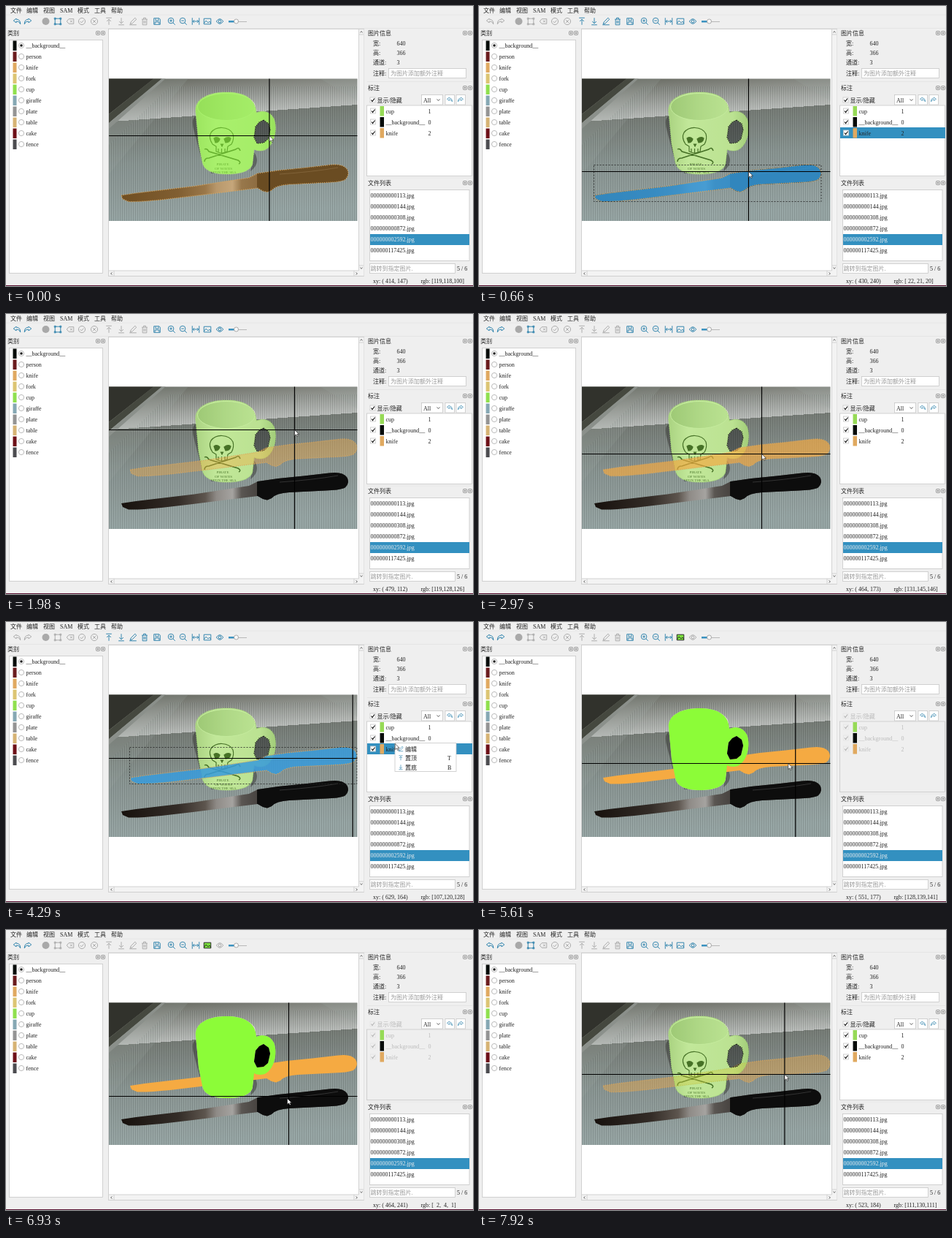
These frames come from a looping animation (640x383 px, 8000 ms). An HTML page:

```html
<!DOCTYPE html>
<html lang="zh">
<head>
<meta charset="utf-8">
<style>
html, body { margin: 0; width: 100%; height: 100%; overflow: hidden; background: #efefef }
svg { display: block; width: 100vw; height: 100vh }
text { font: 8px "Liberation Serif", "Noto Sans CJK SC", "Noto Sans CJK", serif; fill: #222; white-space: pre }
.icon { fill: none; stroke: #2c81ab; stroke-linejoin: round }
.off { stroke: #a9a9a9 }
.box { fill: #fff; stroke: #c8c8c8; stroke-width: .8 }
.hint { fill: #999 }
.dim text, .dim .check { opacity: .25 }
.dim .box { fill: #efefef }
.light { fill: #eee }
.print { fill: none; stroke: #1c1c1c; stroke-width: 1.2 }
.print text { font-size: 5px; text-anchor: middle; fill: #2a2a2a; stroke: none }
.mask { stroke-width: 1.2; stroke-dasharray: 1.2 1.6; fill-rule: evenodd }
</style>
</head>
<body>
<svg viewBox="0 0 640 383">
  <defs>
    <linearGradient id="table" x2=".12" y2="1">
      <stop stop-color="#5f6158"/><stop offset=".3" stop-color="#74797380"/>
      <stop offset=".3" stop-color="#737872"/>
      <stop offset=".6" stop-color="#87928f"/><stop offset="1" stop-color="#95a3a2"/>
    </linearGradient>
    <linearGradient id="blade">
      <stop stop-color="#17110d"/><stop offset=".25" stop-color="#332c27"/>
      <stop offset=".37" stop-color="#5d554e"/><stop offset=".42" stop-color="#8f8b87"/>
      <stop offset=".49" stop-color="#a5a3a0"/><stop offset=".53" stop-color="#5a5652"/>
      <stop offset=".59" stop-color="#4a4643"/>
    </linearGradient>
    <linearGradient id="mugSide">
      <stop stop-color="#bdb9ae"/><stop offset=".25" stop-color="#e2dad5"/>
      <stop offset=".8" stop-color="#d8d1c9"/><stop offset="1" stop-color="#b0afa2"/>
    </linearGradient>
    <linearGradient id="mugInside">
      <stop stop-color="#a9a99c"/><stop offset=".5" stop-color="#c4c1b6"/><stop offset="1" stop-color="#d6d1c8"/>
    </linearGradient>
    <pattern id="stripes" width="3" height="8" patternUnits="userSpaceOnUse">
      <path d="M.5 0V8" stroke="#26302f" stroke-opacity=".13"/>
      <path d="M2 0V8" stroke="#dfe9e8" stroke-opacity=".1"/>
    </pattern>
    <path id="knife" d="M170 213 190 210 270 200.500 345 189 357 183 385 179 420 175.500 455 171.500Q473 169 479 177 484 185 476 192 468 195 450 195.500L400 198Q382 199 376 206L370 208.500 364 207 357 203 284 212 225 219Q195 222 180 221.500L172 218z"/>
    <path id="hole" d="M353 156 360 161 362 169 359 182 353 187 344 188 340 180 342 165 347 159z"/>
    <path id="cup" d="M260 145C258 126 280 118 302 118S342 125 343 146C354 142 362 145 367 154 372 166 369 185 359 194 352 200 344 198 340 196L338 214C337 226 320 230 303 230S271 226 269 213L264 188zM353 156 360 161 362 169 359 182 353 187 344 188 340 180 342 165 347 159z"/>
    <clipPath id="frame"><path d="M141 99.500H481.500V294H141z"/></clipPath>
    <clipPath id="grip"><path d="M356 160H490V230H356z"/></clipPath>
  </defs>
  <g id="ui"></g>
  <g clip-path="url(#frame)">
    <path fill="url(#table)" d="M141 99H482V294H141z"/>
    <path fill="#31322c" d="M141 99H203L141 148z"/>
    <path fill="#45483f" d="M203 99H214L141 160V148z"/>
    <path fill="#8b908b" d="M214 99H219L141 168V160z"/>
    <path fill="#9aa3a1" fill-opacity=".2" d="M219 99H250L141 230V168zM430 99H482V130z"/>
    <path fill="url(#stripes)" d="M225 110H482V294H141V190z"/>
    <path fill="#2c2a27" fill-opacity=".45" d="M262 150Q252 152 258 172L268 210zM340 200Q350 215 335 226z"/>
    <use href="#knife" x="-12" y="46" fill="url(#blade)"/>
    <use href="#knife" x="-12" y="46" fill="#0d0d0d" clip-path="url(#grip)"/>
    <path d="M375 230Q420 227 455 221" fill="none" stroke="#333"/>
    <use href="#cup" fill="url(#mugSide)" fill-rule="evenodd"/>
    <ellipse cx="302" cy="138" rx="39.500" ry="18.500" fill="url(#mugInside)" stroke="#e6dfda"/>
    <g class="print">
      <path d="M283 189Q277 180 281 173 287 166 296 166.500 307 167 311 175 313 182 309 189L304 192 303 199Q296 203 288 199L288 192zM291 195V200M295.500 195V201M300 195V200"/>
      <path d="M272 196Q275 194 278 199L318 211Q323 214 319 216M272 213Q272 208 278 208L315 196Q319 192 321 198" stroke-width="1.500"/>
      <path fill="#1c1c1c" d="M285 181Q289 178 293 182 292 187 287 187zM299 182Q304 178 308 181 307 187 301 187zM294.500 189H297.500L296 192z"/>
      <text x="297" y="218">PIRATE</text>
      <text x="298" y="223.500">OF WAVES</text>
      <text x="298" y="228.500">UPON THE SEA</text>
    </g>
    <g id="masks">
      <g id="cupMask">
        <use href="#cup" id="cupFill" class="mask" fill="#8cfc38" stroke="#a5e070"/>
        <use href="#hole" id="holeFill" class="mask" stroke="#111"/>
      </g>
      <use href="#knife" id="knifeFill" class="mask"/>
    </g>
    <path id="bounds" d="M169.500 171.500H481V221.500H169.500z" fill="none" stroke="#222" stroke-width=".8" stroke-dasharray="2 2"/>
    <path id="cross" stroke="#000" stroke-width="1.200"/>
  </g>
  <g id="menu"></g>
  <path id="arrow" d="M0 0V8L2 6.300 3.500 9 4.800 8.300 3.500 5.800H6z" fill="#fff" stroke="#111" stroke-width=".6"/>
  <path id="plus" d="M-4 0H4M0-4V4" stroke="#fff" stroke-width="1.500"/>
</svg>
<script>
const $ = id => document.getElementById(id);
const text = (x, y, s, attrs = '') => `<text x="${x}" y="${y}" ${attrs}>${s}</text>`;
const rect = (x, y, w, h, attrs = 'class="box"') =>
  `<rect x="${x}" y="${y}" width="${w}" height="${h}" ${attrs}/>`;
const line = (d, color = '#c8c8c8') => `<path d="${d}" fill="none" stroke="${color}" stroke-width=".8"/>`;

const ring = 'M4.800 0A4.800 4.800 0 1 1-4.800 0 4.800 4.800 0 1 1 4.800 0';
const lens = 'M3-1A4 4 0 1 1-5-1 4 4 0 1 1 3-1M2 2 5 5M-3-1H1';
const shapes = {
  undo: 'M-1-4-5-1-1 2V0Q3-1 5 4 5-3-1-3z',
  redo: 'M1-4 5-1 1 2V0Q-3-1-5 4-5-3 1-3z',
  poly: 'M-4-4H4V4H-4zM-5-5h2v2h-2zM3-5h2v2h-2zM-5 3h2v2h-2zM3 3h2v2h-2z',
  back: 'M-5 0-2-3.500H5V3.500H-2zM0-1.500 3 1.500M3-1.500 0 1.500',
  done: ring + 'M-2.500 0-.5 2 2.500-1.500',
  cancel: ring + 'M-2-2 2 2M2-2-2 2',
  up: 'M-4-5H4M0 5V-3M-3 0 0-3 3 0',
  down: 'M-4 5H4M0-5V3M-3 0 0 3 3 0',
  edit: 'M-4 4-3 1 3-5 5-3-1 3zM-5 5H5',
  trash: 'M-4-3H4M-1.500-3V-5H1.500V-3M-3-3V5H3V-3M-1-1V3M1-1V3',
  save: 'M-4.500-4.500H3L4.500-3V4.500H-4.500zM-2-4V-1H2V-4M-3 4V1H3V4',
  zoomIn: lens + 'M-1-3V1',
  zoomOut: lens,
  fit: 'M-5-5V5M5-5V5M-4 0H4M-2-2-4 0-2 2M2-2 4 0 2 2',
  image: 'M-5-4H5V4H-5zM-5 3-2-1 1 2 3 0 5 3',
  eye: 'M-5 0Q0-7 5 0 0 7-5 0M2 0A2 2 0 1 1-2 0 2 2 0 1 1 2 0'
};
const icon = (name, x, y, scale = 1, id = '') =>
  `<path class="icon" id="${id}" d="${shapes[name]}" transform="translate(${x} ${y}) scale(${scale})"/>`;
const check = (x, y) => `<g class="check">${rect(x, y, 7, 7)}
  <path d="M${x + 1.5} ${y + 3.5}l1.500 2 3-4" fill="none" stroke="#111" stroke-width="1.200"/></g>`;
const title = (x, y, s, right) => text(x, y, s) + [right - 7, right].map(cx =>
  rect(cx - 2.5, y - 5, 5, 5, 'rx="1" fill="none" stroke="#777" stroke-width=".7"') +
  line(`M${cx - 1.2} ${y - 3.7}l2.400 2.400m0-2.400l-2.400 2.400`, '#777')).join('');

const classes = [['__background__', '#080c0a'], ['person', '#6b1c1e'], ['knife', '#e0a960'],
  ['fork', '#dcc573'], ['cup', '#8fe04e'], ['giraffe', '#86a8b4'], ['plate', '#949494'],
  ['table', '#d6b374'], ['cake', '#6e1018'], ['fence', '#4c4c50']];
const labels = [['cup', 1, '#96da56'], ['__background__', 0, '#080c0a'], ['knife', 2, '#e0a960']];
const files = ['000000000113', '000000000144', '000000000308', '000000000872', '000000002592', '000000117425'];
const tools = { undo: 15, redo: 30, poly: 71, back: 88, done: 104, cancel: 121, up: 141, down: 158, edit: 174,
  trash: 190, save: 207, zoomIn: 227, zoomOut: 243, fit: 260, image: 276, eye: 293 };

const menus = [['文件', 6], ['编辑', 28], ['视图', 51], ['SAM', 74], ['模式', 98], ['工具', 121], ['帮助', 144]];
let ui = rect(0, 0, 640, 383, 'fill="#efefef"') + menus.map(([s, x]) => text(x, 8.5, s)).join('');
ui += line('M0 12H640M0 30.500H640', '#e2e2e2');
for (const name in tools) ui += icon(name, tools[name], 21, .95, name);
ui += '<circle cx="54.500" cy="21" r="5" fill="#a9a9a9"/>';
ui += line('M305 21.500H330', '#aaa') + rect(305, 20, 10, 2.5, 'fill="#3b92c0"') +
  '<circle cx="315.500" cy="21" r="3" fill="#f8f8f8" stroke="#999" stroke-width=".8"/>';

ui += title(2, 39.5, '类别', 133) + rect(4.5, 46.5, 128, 319);
classes.forEach(([name, color], i) => {
  const y = 54 + i * 15;
  ui += rect(9.5, y - 6.5, 5, 13.5, `fill="${color}"`) + text(27.5, y + 3, name) +
    `<circle class="box" style="stroke:#aaa" cx="21" cy="${y}" r="3.600"/>` +
    (i ? '' : `<circle cx="21" cy="${y}" r="1.800" fill="#222"/>`);
});

ui += rect(140.5, 31.5, 350, 338) + rect(483.5, 32, 7, 337, 'fill="#f3f3f3"') +
  rect(141, 362, 349, 7, 'fill="#f3f3f3"') + line('M483.500 32V362H141M484 39H490M484 355H490M148 362V369M477 362V369') +
  line('M485.500 36.500l1.500-2 1.500 2M485.500 357.500l1.500 2 1.500-2M145.500 364.500l-2 1.500 2 1.500M479.500 364.500l2 1.500-2 1.500', '#555');

ui += title(496, 39.5, '图片信息', 636);
[['宽:', '640'], ['高:', '366'], ['通道:', '3']].forEach(([k, v], i) =>
  ui += text(503, 54 + i * 13, k) + text(535.5, 54 + i * 13, v));
ui += text(503, 94.5, '注释:') + rect(524.5, 85.5, 106, 13) + text(527, 94.5, '为图片添加额外注释', 'class="hint"');
ui += line('M495 103.500H639M495 235H639', '#e2e2e2') + title(496, 114.5, '标注', 636);
ui += `<g id="labels">${check(499, 125)}${text(508.5, 131.500, '显示/隐藏')}${rect(494.5, 136, 144, 96.5)}
  ${rect(495, 166, 144, 15, 'id="pick" fill="#3390c0"')}`;
labels.forEach(([name, count, color], i) => {
  const y = 143.5 + i * 15;
  ui += check(499.5, y - 3.5) + rect(512.5, y - 6.5, 5.5, 13.5, `fill="${color}"`) +
    text(520.5, y + 3, name) + text(578.5, y + 3, count);
});
ui += '</g>' + rect(569.5, 121.5, 29, 13.5) + text(572, 131.5, 'All') + line('M590.500 127.500l2 2 2-2', '#333') +
  rect(602, 121.5, 12.5, 13.5) + rect(617, 121.5, 12.5, 13.5) + icon('undo', 608, 128, .7) + icon('redo', 623, 128, .7);

ui += title(496, 244.5, '文件列表', 636) + rect(498.5, 251.5, 136.5, 97) + rect(499, 312, 136, 15, 'fill="#3390c0"');
files.forEach((f, i) => ui += text(499.5, 262 + i * 15, f + '.jpg', i == 4 ? 'class="light"' : ''));
ui += rect(498.5, 352.5, 117, 13) + text(499.5, 361.5, '跳转到指定图片.', 'class="hint"') + text(618, 361.5, '5 / 6');
ui += text(503, 379, '', 'id="xy"') + text(568.5, 379, '', 'id="rgb"') + rect(0, 382, 640, 1, 'fill="#5a1232"');
$('ui').innerHTML = ui;

$('menu').innerHTML = rect(533, 165.5, 84, 39) + rect(534, 192, 82, 12, 'id="menuPick" fill="#c9e0ee"') +
  [['edit', '编辑', ''], ['up', '置顶', 'T'], ['down', '置底', 'B']].map(([name, s, key], i) =>
    icon(name, 541, 173.5 + i * 12.5, .65) + text(547, 176.5 + i * 12.5, s) + text(605, 176.5 + i * 12.5, key)).join('');

// step, crosshair in image pixels, pointer offset, colour under the crosshair, flags:
// c/k hover cup/knife, s selected, l lower place, m menu, p menu pick, b bitmap, + dragging
const keys = [
  [0, 414, 147, 0, 0, 119, 118, 100, 'lc'],
  [1, 430, 225, 0, 0, 48, 44, 40, 'lk'],
  [2, 430, 240, 0, 0, 22, 21, 20, 'lks'],
  [3, 453, 154, 0, 0, 118, 126, 122, 'sk+'],
  [4, 490, 64, 0, 0, 112, 117, 113, 's+'],
  [5, 484, 92, 0, 0, 115, 122, 119, ''],
  [9, 464, 173, 0, 0, 131, 145, 146, 'k'],
  [11, 560, 168, 0, 0, 118, 131, 136, 'k'],
  [12, 629, 164, 50, -14, 107, 120, 128, 'ks'],
  [13, 629, 164, 58, -20, 107, 120, 128, 'ksm'],
  [14, 629, 164, 78, 12, 107, 120, 128, 'ksmp'],
  [15, 629, 164, 78, 12, 107, 120, 128, 'ks'],
  [16, 600, 168, 0, 0, 117, 129, 134, 'k'],
  [17, 551, 177, -10, 0, 128, 139, 141, 'b'],
  [21, 464, 241, -2, 3, 2, 4, 1, 'b'],
  [23, 500, 204, 0, 0, 101, 118, 104, ''],
  [24, 523, 184, 0, 0, 111, 130, 111, '']
];
const show = (id, on) => $(id).style.display = on ? '' : 'none';
const enable = (names, on) => names.split(' ').forEach(n => $(n).classList.toggle('off', !on));
const set = (id, attrs) => { for (const k in attrs) $(id).setAttribute(k, attrs[k]); };
const pad = (v, n) => String(Math.round(v)).padStart(n);
enable('back done cancel', false);

function draw(step) {
  const i = keys.findLastIndex(k => k[0] <= step), a = keys[i], b = keys[i + 1] || a;
  const f = a == b ? 0 : (step - a[0]) / (b[0] - a[0]);
  const [, ix, iy, ox, oy, ...rgb] = a.slice(0, 8).map((v, j) => v + (b[j] - v) * f);
  const has = flag => a[8].includes(flag);
  const selected = has('s'), bitmap = has('b'), knifeHot = has('k');
  const x = 141 + ix * .53125, y = Math.floor(99 + iy * .5328) + .5;

  set('cross', { d: `M141 ${y}H482M${x} 99V294` });
  const at = { transform: `translate(${x + ox} ${y + oy})` };
  set('arrow', at);
  set('plus', at);
  show('plus', has('+'));
  show('arrow', !has('+'));
  $('xy').textContent = `xy: (${pad(ix, 4)},${pad(iy, 4)})`;
  $('rgb').textContent = `rgb: [${rgb.map(v => pad(v, 3))}]`;

  const stroke = bitmap ? 0 : 1;
  set('cupFill', { 'fill-opacity': bitmap ? 1 : has('c') ? .66 : .38, 'stroke-opacity': stroke });
  set('holeFill', { 'fill-opacity': bitmap ? 1 : .35, 'stroke-opacity': stroke });
  set('knifeFill', {
    x: has('l') ? -12 : 0, y: has('l') ? 46 : 0,
    fill: selected && knifeHot ? '#389cdc' : '#f5aa42', stroke: '#dca558', 'stroke-opacity': stroke,
    'fill-opacity': bitmap ? 1 : selected && knifeHot ? .85 : knifeHot ? .68 : .4
  });
  const top = $(step < 15 ? 'knifeFill' : 'cupMask');
  if ($('masks').lastElementChild != top) $('masks').append(top);
  show('bounds', selected);
  set('bounds', { transform: has('l') ? 'translate(-12 46)' : '' });

  enable('undo redo', !selected);
  enable('poly', !selected && !bitmap);
  enable('up down edit trash', selected);
  enable('eye', !bitmap);
  $('image').style.fill = bitmap ? '#7be03c' : '';
  $('image').style.stroke = bitmap ? '#222' : '';
  $('labels').classList.toggle('dim', bitmap);
  show('pick', selected);
  show('menu', has('m'));
  show('menuPick', has('p'));
}

function tick() {
  draw(Math.floor(performance.now() % 8000 / 330));
  requestAnimationFrame(tick);
}
tick();
</script>
</body>
</html>
```
